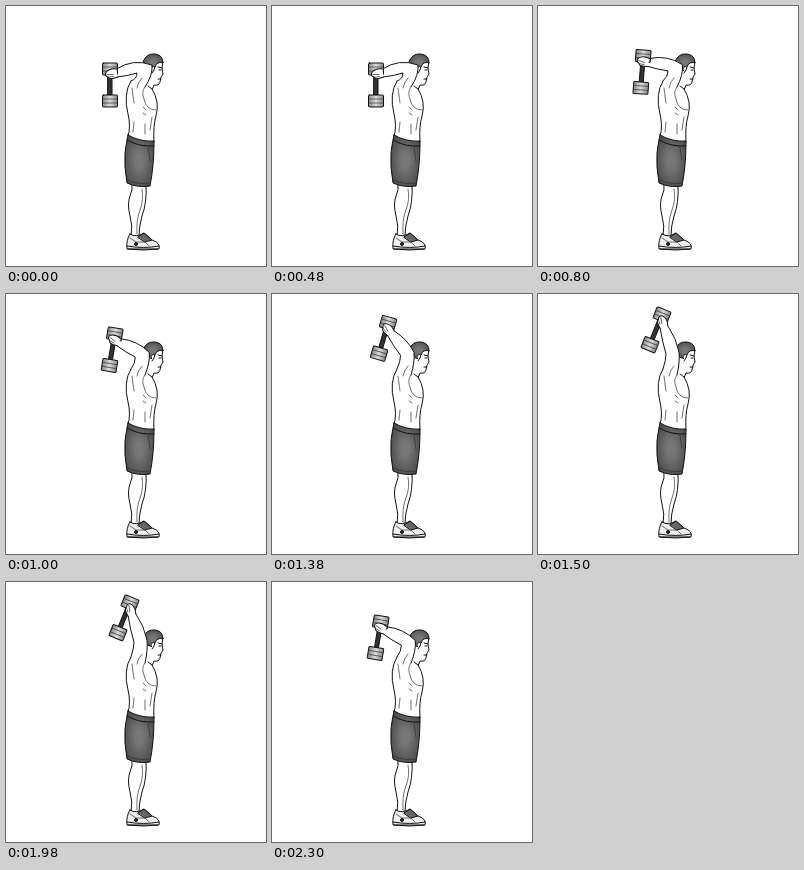
Recreate the animation shown at these times as an HTML page. Size 260 by 260 pixels, loop 2.5 s.

```html
<!DOCTYPE html>
<html lang="en">
<head>
<meta charset="utf-8">
<title>Overhead triceps extension</title>
<style>
  html, body { margin: 0; width: 100%; height: 100%; overflow: hidden; background: #fff; }
  svg { display: block; width: 100vw; height: 100vh; }
  path { fill: none; }
  .skin { fill: #fff; }
  .bare { fill: #fff; stroke: none; }
  .fine { stroke-width: .7; stroke: #333; }
</style>
</head>
<body>
<svg viewBox="0 0 260 260" stroke="#111" stroke-linecap="round" stroke-linejoin="round">
  <defs>
    <radialGradient id="cloth" r=".65">
      <stop offset=".2" stop-color="#777"/><stop offset="1" stop-color="#444"/>
    </radialGradient>
    <linearGradient id="metal">
      <stop stop-color="#888"/><stop offset=".5" stop-color="#ddd"/><stop offset="1" stop-color="#888"/>
    </linearGradient>
    <g id="plate">
      <rect x="-7.5" y="-6" width="15" height="12" rx="1" fill="url(#metal)"/>
      <path class="fine" d="M-7-2H7M-7 2H7"/>
    </g>
  </defs>

  <g id="leg">
    <path class="skin" d="M126 178Q127 184 124 190Q121 198 124 210Q127 220 125 230H133Q133 220 136 210Q141 197 140 179"/>
    <path class="fine" d="M136 183Q138 194 134 204T131 228"/>
  </g>

  <g id="shoe">
    <path fill="#eee" style="fill:#eee" d="M124 228Q120 234 121 243Q138 245 153 243Q155 237 146 234L138 227Q130 232 124 228Z"/>
    <path style="fill:#666" d="M132 231L138 227L146 234L139 236Z"/>
    <path d="M121 240Q138 243 153 240M122 243H152"/>
    <path class="fine" d="M124 232L130 236H139L143 240"/>
    <circle cx="130" cy="238" r="1.5" fill="#333"/>
  </g>

  <g id="head">
    <path class="skin" d="M140 60V78L146 84L148 79Q153 80 154 76L155 71L157 68L156 62L157 56L148 52Z"/>
    <path style="fill:url(#cloth)" d="M137 56Q140 47 149 48Q157 49 157 57Q151 55 149 61L147 65L141 63Z"/>
    <path class="skin" d="M146 61Q150 59 148 64L146 67"/>
    <path d="M152 61L156 62M153 64H155M152 73H155"/>
  </g>

  <g id="torso">
    <path class="bare" d="M126 73Q117 88 122 108Q125 120 122 131L148 136Q147 120 150 110Q154 96 146 83L139 72Z"/>
    <path d="M125 75Q117 88 122 108Q125 120 122 131M148 136Q147 120 150 110Q154 96 146 83L142 80"/>
    <path class="fine" d="M139 81Q135 86 138 93Q140 104 150 104M126 82L128 97M137 101L140 104M137 107L140 109M146 111L144 124M139 118V128M128 116L127 126"/>
  </g>

  <g id="shorts">
    <path style="fill:url(#cloth)" d="M122 129Q134 136 148 135Q148 160 144 180Q132 182 121 177Q118 160 119 147Q120 138 122 129Z"/>
    <path d="M121 134Q133 141 148 140"/>
    <path class="fine" d="M121 174Q132 179 144 177M142 141L144 155"/>
  </g>

  <path id="armFill" class="bare"/>
  <path id="armEdges"/>
  <path class="fine" d="M136 72Q132 76 131 82"/>
  <g id="weight">
    <rect x="-2" y="5" width="4" height="21" fill="#333"/>
    <use href="#plate"/>
    <use href="#plate" y="32"/>
  </g>
  <g id="hand">
    <path class="skin" d="M0-4Q-7-6-11-2Q-13 1-9 3Q-9 6 0 4"/>
    <path class="fine" d="M-10 0L-4 1M-9 3H-4"/>
  </g>
</svg>
<script>
  // Start time in ms and how far the weight is lifted, 0 to 1.
  const steps = [[0, 0], [800, .31], [1000, .55], [1200, .81], [1500, 1], [2300, .55]];
  const set = (id, name, value) => document.getElementById(id).setAttribute(name, value);
  const mix = (a, b, p) => a.map((v, i) => v + (b[i] - v) * p);
  const along = ([x, y], [nx, ny], d) => [x + nx * d, y + ny * d];

  function show(lift) {
    const weight = [104 + 20 * lift ** 2.4, 63 - 42 * lift];
    const wrist = mix([7, 4], [2, 12], lift).map((v, i) => v + weight[i]);
    const elbow = mix([146, 59], [141, 58], lift);
    const crook = mix([131, 67], [128, 60], lift);
    const middle = mix(elbow, crook, .5);
    const angle = Math.atan2(middle[1] - wrist[1], middle[0] - wrist[0]);
    const normal = [Math.sin(angle), -Math.cos(angle)];

    const top = along(wrist, normal, 4), under = along(wrist, normal, -4);
    const topBend = along(mix(top, elbow, .5), normal, 9 - 6 * lift);
    const underBend = along(mix(under, crook, .5), normal, -1);
    const outer = `${top}Q${topBend} ${elbow}Q${along(elbow, [.1, 1], 10)} 139 81`;
    const inner = `125 75Q${along(crook, [0, 1], 6)} ${crook}Q${underBend} ${under}`;
    set('armFill', 'd', `M${outer}L${inner}Z`);
    set('armEdges', 'd', `M${outer}M${inner}`);
    set('weight', 'transform', `translate(${weight}) rotate(${22 * lift ** 1.4})`);
    set('hand', 'transform', `translate(${wrist}) rotate(${angle * 180 / Math.PI})`);
  }

  function tick() {
    const time = performance.now() % 2500;
    show(steps.findLast(([start]) => start <= time)[1]);
    requestAnimationFrame(tick);
  }
  tick();
</script>
</body>
</html>
```
